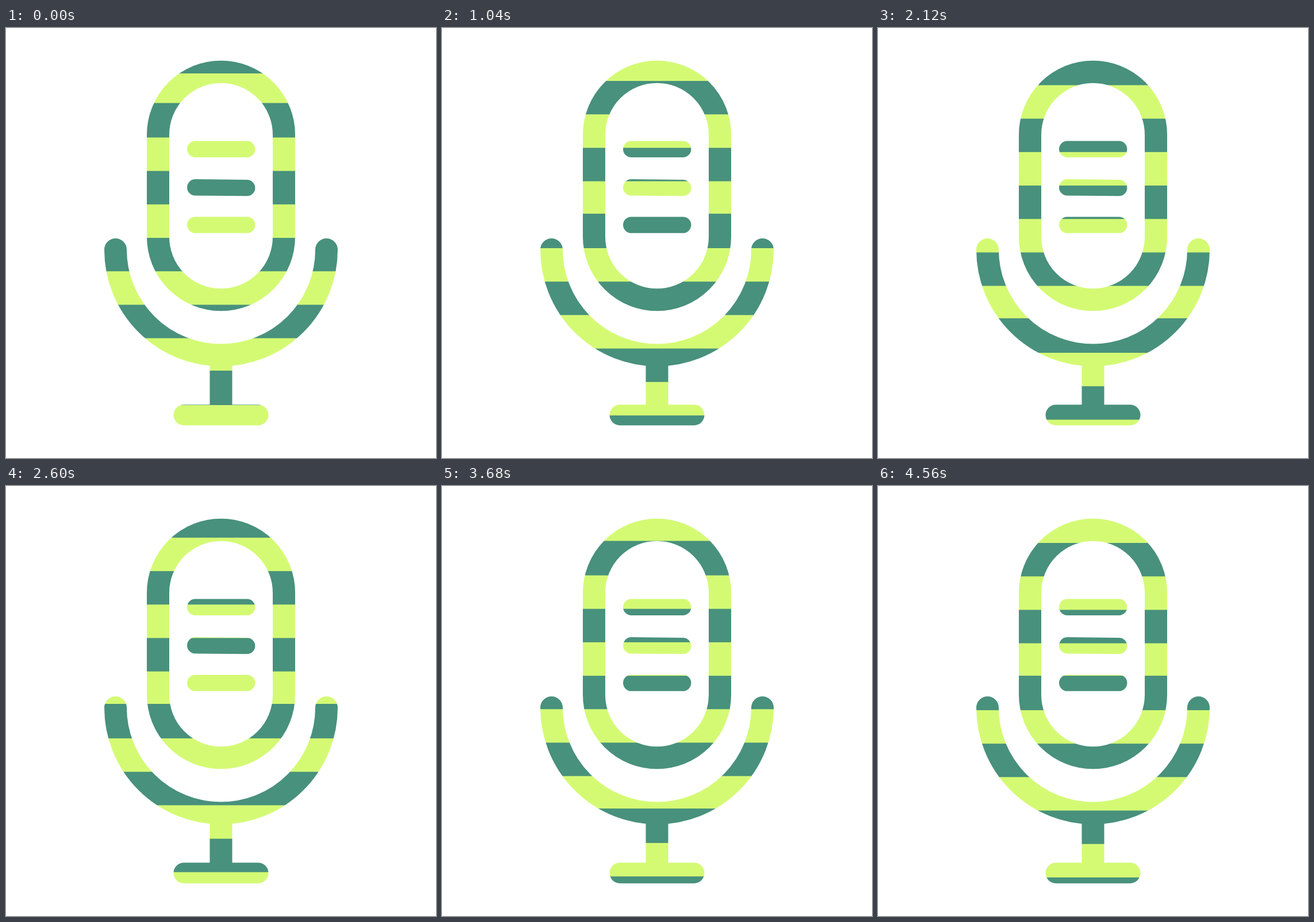
An HTML page with a canvas that plays this animation: 748 px wide and 748 px high, repeating every 6520 ms.

```html
<!DOCTYPE html>
<html lang="en">
<head>
<meta charset="utf-8">
<title>Microphone</title>
<style>
  html, body { margin: 0; width: 100%; height: 100%; overflow: hidden; background: #fff; }
  canvas { display: block; width: 748px; height: 748px; }
</style>
</head>
<body>
<canvas id="stage" width="748" height="748"></canvas>
<script>
const ctx = document.getElementById('stage').getContext('2d');
const SIZE = 748, CX = 374;
const DARK = '#48917c', LIGHT = '#d4fa74';

const LOOP = 6520, STEP = 40, LAST = 4560;
const SPEED = 0.2625;               // px per ms, upwards
const PITCH = 116.375;              // light band to light band
const BANDS = 18, FIRST = 74.1, START = 79;

function line(x1, y1, x2, y2, width, cap) {
  ctx.lineWidth = width;
  ctx.lineCap = cap;
  ctx.beginPath();
  ctx.moveTo(x1, y1);
  ctx.lineTo(x2, y2);
  ctx.stroke();
}

function drawMic() {
  ctx.strokeStyle = DARK;

  // capsule
  ctx.lineWidth = 39;
  ctx.beginPath();
  ctx.roundRect(264.5, 76.2, 219, 396.6, 109.5);
  ctx.stroke();

  // grille
  line(329.2, 210.7, 419.2, 210.7, 28.4, 'round');
  line(329.2, 277.3, 419.2, 278.1, 28.4, 'round');
  line(329.2, 342.6, 419.2, 342.6, 28.4, 'round');

  // cradle
  ctx.lineWidth = 39;
  ctx.lineCap = 'round';
  ctx.beginPath();
  ctx.arc(CX, 385.5, 183.5, 0, Math.PI);
  ctx.stroke();

  // stand
  line(CX, 569, CX, 673, 39, 'butt');
  line(309.5, 673.2, 438.5, 673.2, 36, 'round');
}

function drawBands(shift) {
  ctx.fillStyle = LIGHT;
  for (let k = 0; k < BANDS; k++) {
    const y = FIRST + k * PITCH;
    const top = Math.max(y, START);
    const bottom = y + (k % 4 ? 58.2 : 56.4);   // every fourth band is shorter
    ctx.fillRect(0, top - shift, SIZE, bottom - top);
  }
}

function draw(time) {
  const t = Math.min(Math.floor((time % LOOP) / STEP) * STEP, LAST);
  ctx.clearRect(0, 0, SIZE, SIZE);
  ctx.globalCompositeOperation = 'source-over';
  drawMic();
  ctx.globalCompositeOperation = 'source-atop';
  drawBands(t * SPEED);
}

const begin = performance.now();
function tick() {
  draw(performance.now() - begin);
  requestAnimationFrame(tick);
}
tick();
</script>
</body>
</html>
```
